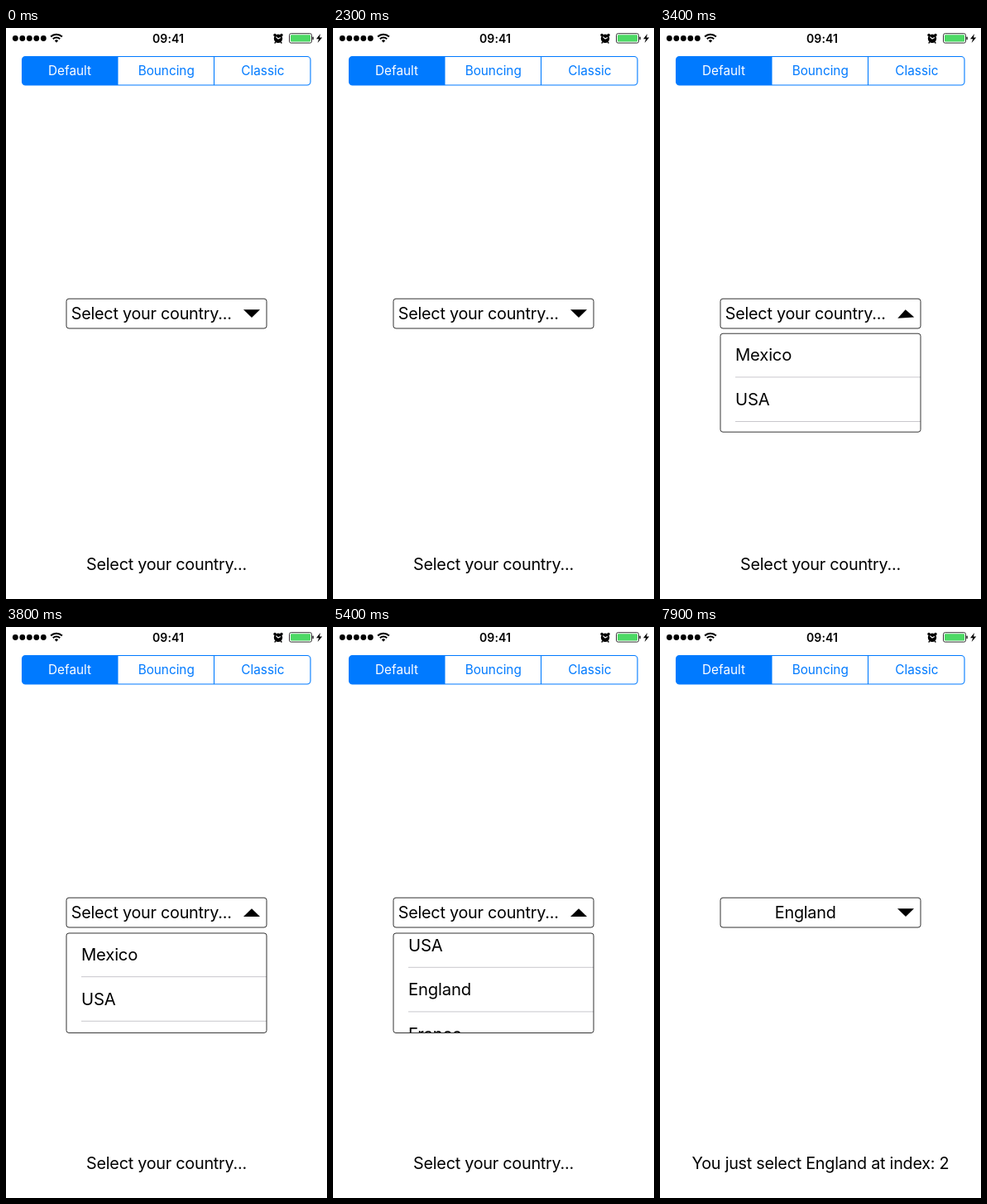
These frames come from a looping animation (388 px wide and 690 px high, 8000 ms). An HTML page with a canvas:

```html
<!DOCTYPE html>
<html lang="en">
<head>
<meta charset="utf-8">
<title>Drop-down</title>
<style>
  html, body { margin: 0; width: 100%; height: 100%; overflow: hidden; background: #fff; }
  canvas { display: block; width: 388px; height: 690px; }
</style>
</head>
<body>
<canvas id="stage"></canvas>
<script>
const W = 388, H = 690, LOOP = 8000;
const BLUE = '#007aff', INK = '#000', LINE = '#c8c7cc';
const OPEN = 2865, SCROLL = 4000, PICK = 5450, CLOSE = 6560;
const ROW = 53.6, SCROLLED = 65;
const COUNTRIES = ['Mexico', 'USA', 'England', 'France', 'Germany'];
const PROMPT = 'Select your country...';

const canvas = document.getElementById('stage');
const ctx = canvas.getContext('2d');
const dpr = window.devicePixelRatio || 1;
canvas.width = W * dpr;
canvas.height = H * dpr;

const clamp = v => Math.max(0, Math.min(1, v));
const lerp = (a, b, k) => a + (b - a) * k;
const ease = k => k * k * (3 - 2 * k);

// Damped spring from 0 to 1 that settles in 0.9 s
function spring(ms, damping) {
  if (ms <= 0) return 0;
  const t = ms / 1000, decay = 6.9 / 0.9;
  const wd = decay / damping * Math.sqrt(1 - damping * damping);
  return 1 - Math.exp(-decay * t) * (Math.cos(wd * t) + decay / wd * Math.sin(wd * t));
}

function text(str, x, y, size, { color = INK, align = 'left', weight = 400, track = 0 } = {}) {
  ctx.font = `${weight} ${size}px Inter, "Liberation Sans", sans-serif`;
  ctx.letterSpacing = track + 'px';
  ctx.textAlign = align;
  ctx.fillStyle = color;
  ctx.fillText(str, x, y);
}

function box(x, y, w, h, r) {
  ctx.beginPath();
  ctx.roundRect(x, y, w, h, r);
}

function poly(points) {
  ctx.beginPath();
  points.forEach(([x, y]) => ctx.lineTo(x, y));
}

function dot(x, y, r) {
  ctx.beginPath();
  ctx.arc(x, y, r, 0, 7);
  ctx.fill();
}

function stroke(color, width = 1) {
  ctx.strokeStyle = color;
  ctx.lineWidth = width;
  ctx.stroke();
}

function drawStatus() {
  ctx.fillStyle = INK;
  for (let i = 0; i < 5; i++) dot(11.3 + i * 8.5, 12.5, 3.4);

  // Wi-Fi
  const up = -Math.PI / 2, half = 0.78;
  for (const r of [6, 9.8]) {
    ctx.beginPath();
    ctx.arc(61, 17.5, r, up - half, up + half);
    stroke(INK, 1.9);
  }
  ctx.beginPath();
  ctx.moveTo(61, 17.8);
  ctx.arc(61, 17.5, 3.1, up - half, up + half);
  ctx.fill();

  text('09:41', 196, 17.5, 14, { align: 'center', weight: 600, track: 0.1 });

  // Alarm
  ctx.fillStyle = INK;
  dot(329, 12.8, 5.2);
  dot(325, 8.4, 1.7);
  dot(333, 8.4, 1.7);
  poly([[326, 17], [324.6, 18.4]]);
  stroke(INK, 1.4);
  poly([[332, 17], [333.4, 18.4]]);
  stroke(INK, 1.4);
  poly([[326.3, 10.6], [329, 13], [331.8, 11.4]]);
  stroke('#fff', 1.1);

  // Battery
  box(342.5, 6.7, 27, 11.4, 2);
  stroke('#333');
  ctx.fillStyle = '#4cd964';
  box(344, 8.2, 24, 8.4, 1);
  ctx.fill();
  ctx.fillStyle = '#333';
  box(370.3, 10.4, 1.6, 4, 0.8);
  ctx.fill();

  ctx.fillStyle = INK;
  poly([[380, 7], [375, 13.2], [378.2, 13.2], [376.6, 18], [382.2, 11.4], [378.9, 11.4]]);
  ctx.fill();
}

function drawTabs() {
  ctx.fillStyle = BLUE;
  box(19.5, 34.5, 116, 34.5, [4, 0, 0, 4]);
  ctx.fill();
  box(19.5, 34.5, 348.5, 34.5, 4);
  stroke(BLUE, 1.1);
  poly([[251.5, 34.5], [251.5, 69]]);
  stroke(BLUE, 1.1);
  ['Default', 'Bouncing', 'Classic'].forEach((name, i) =>
    text(name, 77 + i * 116.7, 57.4, 15.3, { align: 'center', color: i ? BLUE : '#fff' }));
}

function drawList(open, scroll, picked) {
  if (open <= 0.002) return;
  const y = lerp(327.2, 370, open), h = lerp(36, 120.5, open);
  ctx.save();
  ctx.globalAlpha = clamp(open);
  box(73, y, 242, h, 3);
  ctx.fillStyle = '#fff';
  ctx.fill();
  ctx.save();
  ctx.clip();
  COUNTRIES.forEach((name, i) => {
    const top = y + i * ROW - scroll;
    text(name, 91, top + 33.2, 20.3, { track: -0.2 });
    poly([[91, top + 52.7], [315, top + 52.7]]);
    stroke(LINE);
    if (picked && name === 'England') {
      poly([[281, top + 68.6 - 37.5], [285.6, top + 35.5], [295.2, top + 25.2]].map(([px, py], k) =>
        [px, k ? py : top + 30.8]));
      stroke(BLUE, 2.4);
    }
  });
  ctx.restore();
  box(73, y, 242, h, 3);
  stroke('#333');
  ctx.restore();
}

function drawButton(open, t) {
  box(73, 327.2, 242, 35.8, 3);
  ctx.fillStyle = '#fff';
  ctx.fill();
  stroke('#333');

  if (t < PICK) {
    text(PROMPT, 175.7, 352.4, 19.8, { align: 'center', track: -0.25 });
  } else {
    ctx.globalAlpha = ease(clamp((t - PICK) / 600));
    text('England', 175.7, 352.4, 19.8, { align: 'center', track: -0.25 });
    ctx.globalAlpha = 1;
  }

  ctx.save();
  ctx.translate(297, 345.2);
  ctx.rotate(Math.PI * open);
  poly([[-10, -4.9], [10, -4.9], [0, 4.9]]);
  ctx.fillStyle = INK;
  ctx.fill();
  ctx.restore();
}

function draw(t) {
  const open = t < CLOSE ? spring(t - OPEN, 0.5) : 1 - spring(t - CLOSE, 0.9);
  const scroll = SCROLLED * ease(clamp((t - SCROLL) / 1000));
  const picked = t >= PICK;

  ctx.setTransform(dpr, 0, 0, dpr, 0, 0);
  ctx.fillStyle = '#fff';
  ctx.fillRect(0, 0, W, H);
  drawStatus();
  drawTabs();
  drawList(open, scroll, picked);
  drawButton(open, t);
  text(picked ? 'You just select England at index: 2' : PROMPT, 194, 654.8, 19.8,
    { align: 'center', track: -0.25 });
}

const start = performance.now();
function tick(now) {
  draw(Math.max(0, now - start) % LOOP);
  requestAnimationFrame(tick);
}
draw(0);
requestAnimationFrame(tick);
</script>
</body>
</html>
```
